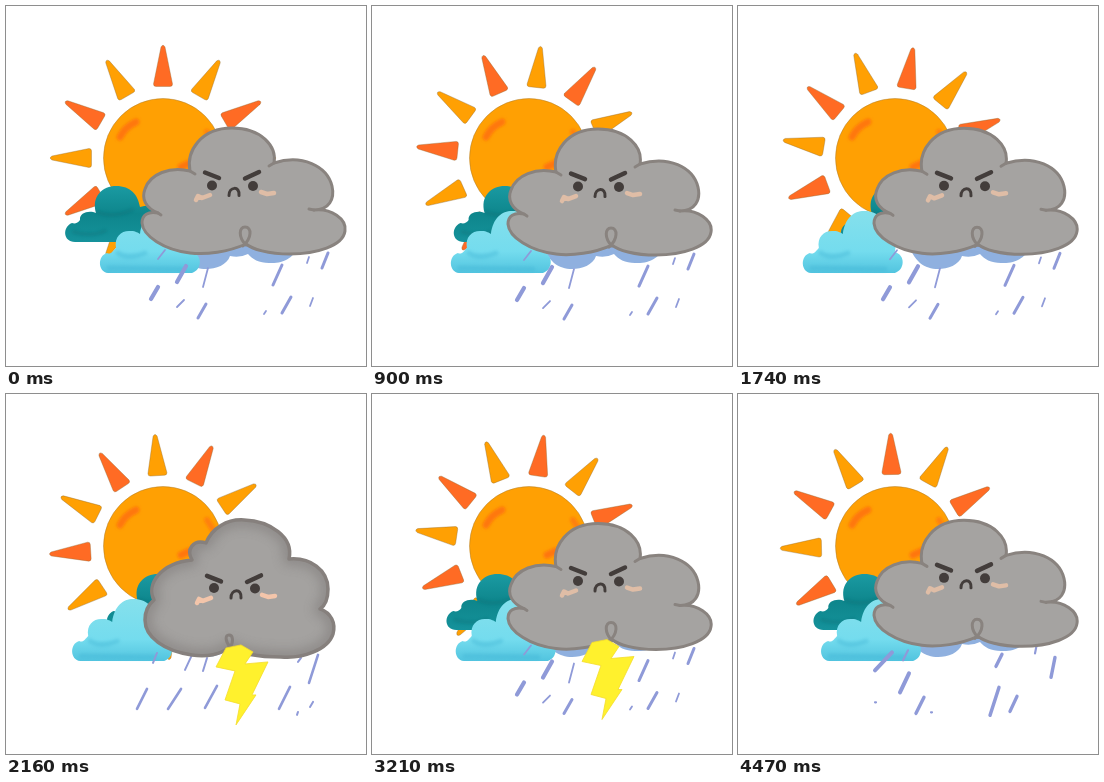
Write an HTML page that moves like this. It is 360 px wide and 360 px high and loops after 4500 ms.

```html
<!DOCTYPE html>
<html lang="en">
<head>
<meta charset="utf-8">
<title>Weather</title>
<style>
html, body { margin: 0; width: 100%; height: 100%; overflow: hidden; background: #fff; }
svg { display: block; width: 100vw; height: 100vh; }
.line { fill: none; stroke-linecap: round; stroke-linejoin: round; }
</style>
</head>
<body>
<svg viewBox="0 0 360 360">
  <defs>
    <filter id="soft" x="-50%" y="-50%" width="200%" height="200%"><feGaussianBlur stdDeviation="1.6"/></filter>
    <filter id="shade" x="-20%" y="-20%" width="140%" height="140%"><feGaussianBlur stdDeviation="6"/></filter>
    <linearGradient id="teal" x2="0" y2="1"><stop offset="0" stop-color="#1a9aa2"/><stop offset=".5" stop-color="#0e868c"/><stop offset="1" stop-color="#15929b"/></linearGradient>
    <linearGradient id="cyan" x2="0" y2="1"><stop offset="0" stop-color="#85e0ec"/><stop offset=".65" stop-color="#74dcee"/><stop offset="1" stop-color="#52c4df"/></linearGradient>
    <path id="shapeB" d="M183 160C178 150 186 139 198 142C202 124 217 115 236 116C260 117 277 134 272 153C292 148 313 160 314 176C315 185 310 191 304 192C320 196 327 212 324 222C318 240 292 252 266 250C250 249 240 245 236 238C228 247 202 251 186 249C160 247 138 232 137 217C137 209 142 205 149 201C140 188 148 158 183 160Z"/>
    <path id="shapeC" d="M186 153C180 143 187 132 200 136C206 121 221 112 238 113C264 114 288 130 283 152C304 150 322 163 322 182C322 192 320 198 314 202C325 206 330 216 327 227C322 243 296 252 275 250C255 250 235 247 224 240C215 248 200 250 186 248C158 244 139 230 139 213C139 204 142 198 148 193C140 178 154 156 186 153Z"/>
    <clipPath id="clipB"><use href="#shapeB"/></clipPath>
    <clipPath id="clipC"><use href="#shapeC"/></clipPath>
    <g id="face">
      <g fill="#433d3b"><circle cx="206" cy="179.500" r="5"/><circle cx="247" cy="180" r="5"/></g>
      <path class="line" stroke="#433d3b" stroke-width="3" d="M223 189.500C223 180.500 234 179.500 233 189.500"/>
    </g>
    <path id="brows" class="line" stroke="#433d3b" stroke-width="4.500" d="M199 166.500L213 172M239 172.500L253 166"/>
    <path id="cheeks" class="line" stroke-width="4.500" d="M190 194L192 190L196 192L204 189M255 186L261 188L268 187"/>
  </defs>

  <g id="rays" stroke="#8c6a35" stroke-opacity=".5" stroke-width=".7"></g>

  <circle cx="157" cy="152" r="59.500" fill="#ffa003" stroke="#a87a30" stroke-opacity=".6" stroke-width=".8"/>
  <g class="line" stroke="#ff6a12" filter="url(#soft)">
    <path stroke-width="7" opacity=".75" d="M114 131Q119 121 130 116"/>
    <path stroke-width="7" opacity=".8" d="M175 161L184 157"/>
    <path stroke-width="6" opacity=".6" d="M201 126L208 137"/>
  </g>

  <g id="dark">
    <path fill="url(#teal)" d="M69 236C57 236 56 221 66 217C69 218 72 217 74 214C73 206 84 204 90 207C85 190 97 180 110 180C125 180 132 189 134 201C150 196 162 206 158 218C168 224 163 236 152 236Z"/>
    <path class="line" stroke="#087077" stroke-width="4" opacity=".35" filter="url(#soft)" d="M92 206Q105 213 126 204M68 226Q85 231 99 225"/>
  </g>

  <path fill="#8fb0df" d="M170 235L295 235C289 253 276 258 263 257C253 257 246 253 242 248Q234 252 224 250C221 259 210 263 200 263C187 263 175 256 170 235Z"/>

  <g id="light">
    <path fill="url(#cyan)" d="M102 267C92 266 91 250 101 247C105 249 107 245 110 242C108 230 116 224 125 225C130 225 132 227 134 228C136 212 145 205 155 205C170 205 178 215 178 230C186 231 188 238 186 246C197 249 196 264 186 267Z"/>
    <path class="line" stroke="#43b6d5" stroke-width="5" opacity=".4" filter="url(#soft)" d="M112 247Q122 254 139 247M103 262L176 263"/>
  </g>

  <g id="storm">
    <g id="rain"></g>
    <g id="cloudA">
      <path class="line" style="fill:#a5a3a1" stroke="#89837f" stroke-width="3" d="M152 207C140 202 135 193 139 183C144 168 164 160 184 165C180 145 195 122 226 122C255 122 271 140 268 157C296 148 321 160 326 180C329 193 323 204 308 204C325 202 341 213 339 225C337 240 310 248 284 248C262 248 246 243 240 238C222 246 200 249 184 247C158 244 137 230 136 217C136 209 142 205 152 207Z"/>
      <path class="line" stroke="#89837f" stroke-width="3" d="M240 239C232 231 233 221 239 221C246 221 246 232 237 240M184 165L189 168M268 157L263 160M308 204L303 203M152 207L155 209"/>
      <use href="#cheeks" stroke="#dfbda6"/>
      <use href="#face"/>
      <use href="#brows"/>
    </g>
    <g id="cloudB">
      <use href="#shapeB" fill="#a4a2a0"/>
      <g clip-path="url(#clipB)"><use href="#shapeB" class="line" stroke="#6f6b69" stroke-width="12" opacity=".45" filter="url(#shade)"/></g>
      <use href="#shapeB" class="line" stroke="#86807d" stroke-width="3.500"/>
      <path class="line" stroke="#86807d" stroke-width="3" d="M236 239C230 232 231 226 235 226C240 226 240 233 236 239"/>
      <use href="#cheeks" x="1" y="2" stroke="#ece2c6"/>
      <use href="#face" x="2" y="1.500"/>
      <use href="#brows" x="2" y="5"/>
    </g>
    <g id="cloudC">
      <use href="#shapeC" fill="#a4a2a0"/>
      <g clip-path="url(#clipC)"><use href="#shapeC" class="line" stroke="#6f6b69" stroke-width="12" opacity=".45" filter="url(#shade)"/></g>
      <use href="#shapeC" class="line" stroke="#86807d" stroke-width="3.500"/>
      <path class="line" stroke="#86807d" stroke-width="3" d="M224 240C219 234 219 228 223 228C227 228 228 235 224 240"/>
      <use href="#cheeks" x="1" y="2" stroke="#f3c5aa"/>
      <use href="#face" x="2" y="1.500"/>
      <use href="#brows" x="2" y="2.500"/>
    </g>
    <path id="bolt" fill="#fff12d" stroke="#f4dc2c" stroke-width=".8" stroke-linejoin="round" d="M210 260L220 241L235 238L247 245L239 257L262 255L246 288L250 288L230 318L234 297L219 293L229 264Z"/>
  </g>
</svg>

<script>
const LOOP = 4500, STEP = 30, BOB = 865, DRIFT = 3820;
const $ = id => document.getElementById(id);
const NS = "http://www.w3.org/2000/svg";

function add(parent, tag, attrs) {
  const el = parent.appendChild(document.createElementNS(NS, tag));
  for (const k in attrs) el.setAttribute(k, attrs[k]);
  return el;
}

for (let i = 0; i < 12; i++) {
  add($("rays"), "path", {
    d: "M155 41Q157 37.5 159 41L166.5 78Q166.5 80.5 164 80.5L150 80.5Q147.5 80.5 147.5 78Z",
    fill: i % 2 ? "#ffa003" : "#ff6b24",
    transform: `rotate(${i * 30} 157 152)`
  });
}

// Streaks grouped by stroke width, one set per rain pose.
const rain = [
  [[4.2, "M152 281L145 293M180 260L171 276"],
   [3, "M200 298L192 312M276 259L267 279M285 291L276 307M322 247L316 262"],
   [1.8, "M178 294L171 301M159 244L152 253M202 262L197 281M303 251L301 257M307 292L304 300M260 305L258 308"]],
  [[4, "M171 275L162 294M154 254L137 272"],
   [3.4, "M186 299L178 315M261 289L252 317M279 298L272 313M317 259L313 279M264 256L258 268"],
   [2.2, "M170 252L165 262M299 245L297 255M137 304L138 304M193 314L194 314"]],
  [[2.6, "M141 282L131 302M175 282L162 302M211 279L199 301M312 248L303 276M284 280L273 302"],
   [2, "M186 248L179 263M201 251L197 264M151 246L147 256M307 295L304 300M295 251L292 255M292 305L291 308"]]
].map(set => {
  const g = add($("rain"), "g", { class: "line", stroke: "#8f9ad8" });
  for (const [w, d] of set) add(g, "path", { d, "stroke-width": w });
  return g;
});

const swing = (t, period) => 1 - Math.abs(1 - 2 * (t % period) / period);
const show = (el, on) => el.setAttribute("visibility", on ? "visible" : "hidden");
const move = (el, x, y) => el.setAttribute("transform", `translate(${x} ${y})`);

function draw(now) {
  const t = Math.floor((now % LOOP) / STEP) * STEP;
  const turn = t / LOOP * 180, rad = turn * Math.PI / 180;
  const dx = Math.cos(rad) - 1, dy = Math.sin(rad);
  $("rays").setAttribute("transform", `translate(${dx} ${dy}) rotate(${turn} 157 152)`);

  const drift = swing(t, DRIFT);
  move($("dark"), 48 * drift, 0);
  move($("light"), -32 * drift, 0);

  const phase = (t % BOB) / BOB;
  move($("storm"), 0, 13 * swing(t, BOB));
  const puff = phase > 0.86 ? "B" : phase > 0.43 && phase < 0.62 ? "C" : "A";
  for (const k of "ABC") show($("cloud" + k), k === puff);
  show($("bolt"), phase > 0.43);
  const pose = phase < 0.1 || phase > 0.62 ? 0 : phase < 0.36 ? 1 : 2;
  rain.forEach((g, i) => show(g, i === pose));
}

const start = performance.now();
function tick() {
  draw(performance.now() - start);
  requestAnimationFrame(tick);
}
tick();
</script>
</body>
</html>
```
